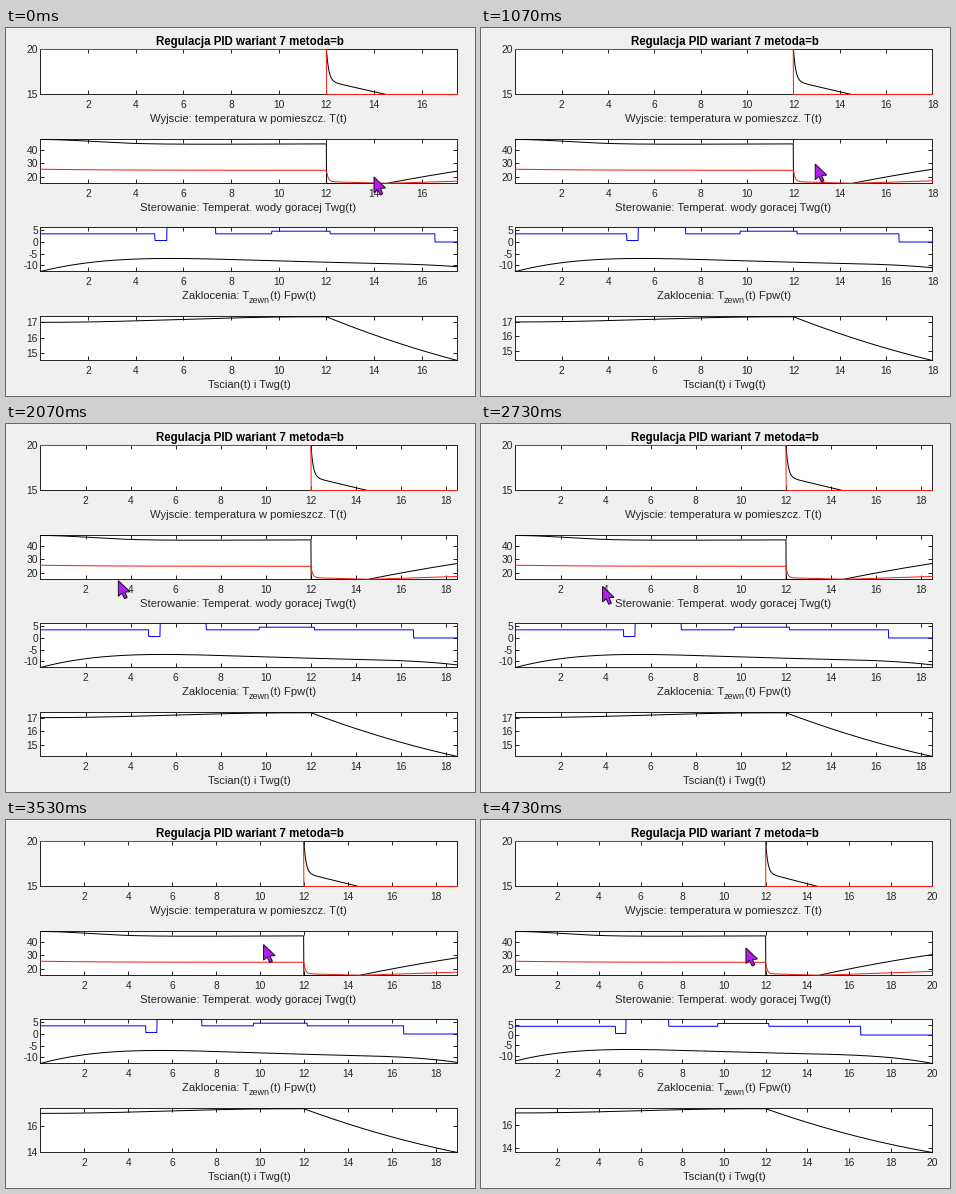
Write a matplotlib script that moves like this. It is 469 px wide and 368 px high and loops after 4990 ms.

```python
import numpy as np
import matplotlib.pyplot as plt
from matplotlib.animation import FuncAnimation
from matplotlib.patches import Polygon

W, H, DPI = 469, 368, 64
LOOP, FRAMES = 4990, 75
STEP = LOOP / FRAMES
PX = 72 / DPI                      # points per pixel
MID = 0.49                         # pixel centre that still snaps downwards
LEFT, RIGHT = 34 + MID, 451 + MID
CENTER = (LEFT + RIGHT) / 2
INK, RED = "#262626", "#f81c12"

plt.rcParams.update({
    "font.family": "Liberation Sans",
    "axes.unicode_minus": False,
    "axes.edgecolor": INK,
    "axes.linewidth": PX,
    "lines.linewidth": PX,
})

# top and bottom pixel row of each panel
ROWS = [(21, 66), (111, 155), (199, 243), (288, 332)]

# cursor tip at its turning points
CURSOR_T = [270, 1070, 2000, 2700, 3400, 3800, 4730]
CURSOR_X = [368, 334, 112, 116, 256, 261, 265]
CURSOR_Y = [149, 136, 156, 164, 123, 128, 128]
ARROW = np.array([(0, 0), (0, 15.5), (3.6, 12.4), (6.2, 18),
                  (8.8, 16.8), (6.4, 11.4), (11.5, 11)])

OUTDOOR = np.polyfit([0, 2, 5.2, 10.2, 13.6, 17.5, 20],
                     [-12.5, -9.3, -6.5, -8.9, -8.4, -10.9, -13.8], 5)


def since(t, start):
    return np.maximum(t - start, 0)


def room(t):
    v = since(t, 12)
    cooling = 16.5 - 0.6 * v + 3.5 * np.exp(-v / 0.1)
    return np.where(t < 12, 20, np.maximum(cooling, 15))


def water(t):
    warm = 43.9 + 3.5 * np.exp(-(t / 3)**2) + 0.05 * since(t, 7)
    u = since(t, 14.5)
    return np.where(t < 12, warm, 15 + 3.35 * u - 0.1 * u**2)


def returned(t):
    v = since(t, 12)
    low = 15.1 + since(1.3, 0.52 * v) + 8.3 * np.exp(-v / 0.07)
    return np.where(t < 12, 24.7 + 0.8 * np.exp(-t / 3),
                    low + 0.53 * since(t, 14.5))


def gains(t):
    edges = [4.8, 5.3, 7.35, 9.7, 12.15, 16.55]
    levels = np.array([3.4, 0.6, 6.05, 3.4, 4.5, 3.4, 0])
    return levels[np.searchsorted(edges, t)]


def wall(t):
    rise = 17 + 0.18 * (1 - np.cos(np.pi * np.minimum(t, 11.5) / 11.5))
    v = since(t, 12)
    return rise - 0.625 * v + 0.02 * v**2


fig = plt.figure(figsize=(W / DPI, H / DPI), dpi=DPI, facecolor="#f0f0f0")


def label(x, y, text, size=11.3, ha="center", color=INK, **kw):
    fig.text(x / W, 1 - y / H, text, ha=ha, va="baseline",
             fontsize=size * PX, color=color, **kw)


def panel(top, bottom):
    ax = fig.add_axes([LEFT / W, 1 - (bottom + MID) / H,
                       (RIGHT - LEFT) / W, (bottom - top) / H])
    ax.tick_params(direction="in", top=True, right=True, length=4 * PX,
                   width=PX, color=INK, labelcolor=INK, labelsize=10.2 * PX)
    ax.tick_params(axis="x", pad=5.2 * PX)
    ax.tick_params(axis="y", pad=2.5 * PX)
    return ax


axes = [panel(*rows) for rows in ROWS]
base = [bottom + 27.8 for _, bottom in ROWS]

label(CENTER + 0.5, 17, "Regulacja PID wariant 7 metoda=b", size=11.5,
      color="black", weight="bold")
label(CENTER - 0.7, base[0], "Wyjscie: temperatura w pomieszcz. T(t)")
label(CENTER - 0.7, base[1], "Sterowanie: Temperat. wody goracej Twg(t)")
label(243, base[2], "Zaklocenia: T", ha="right")
label(253.5, base[2] + 4, "zewn", size=9)
label(264, base[2], "(t) Fpw(t)", ha="left")
label(CENTER, base[3], "Tscian(t) i Twg(t)")


def curve(k, color):
    return axes[k].plot([], [], color=color, clip_on=False, zorder=3)[0]


room_line, goal_line = curve(0, "black"), curve(0, RED)
water_line, return_line = curve(1, "black"), curve(1, RED)
outdoor_line, gain_line = curve(2, "black"), curve(2, "blue")
wall_line = curve(3, "black")

axes[0].set(ylim=(15, 20), yticks=[15, 20])
axes[1].set(ylim=(15, 47.4), yticks=[20, 30, 40])

overlay = fig.add_axes([0, 0, 1, 1], zorder=5)
overlay.set(xlim=(0, W), ylim=(H, 0))
overlay.axis("off")
cursor = Polygon(ARROW, facecolor="#b41eee", edgecolor="#1a0a24",
                 linewidth=PX, joinstyle="miter")
overlay.add_patch(cursor)


def update(i):
    now = i * STEP
    end = 17.5 + 0.5 * ((now + 76) // 936)   # half an hour per refresh
    t = np.linspace(0, end, 1600)

    outdoor, tw = np.polyval(OUTDOOR, t), wall(t)
    low = min(outdoor.min(), -12.5)
    high = 6.05 + 1.1 * (-12.5 - low)

    room_line.set_data(t, room(t))
    goal_line.set_data(t, np.where(t < 12, 20, 15))
    water_line.set_data(t, water(t))
    return_line.set_data(t, returned(t))
    outdoor_line.set_data(t, outdoor)
    gain_line.set_data(t, gains(t) * high / 6.05)
    wall_line.set_data(t, tw)

    for ax in axes:
        ax.set_xticks(np.arange(2, end + 0.1, 2))
        ax.set_xlim(0, end)
    axes[2].set(yticks=[-10, -5, 0, 5], ylim=(low, high))
    axes[3].set(yticks=[14, 16] if tw.min() < 14 else [15, 16, 17],
                ylim=(tw.min(), tw.max() + 0.02))

    tip = [np.interp(now, CURSOR_T, p) for p in (CURSOR_X, CURSOR_Y)]
    cursor.set_xy(ARROW + tip)


anim = FuncAnimation(fig, update, frames=FRAMES, interval=STEP,
                     repeat=True, repeat_delay=0, blit=False)
plt.show()
```
